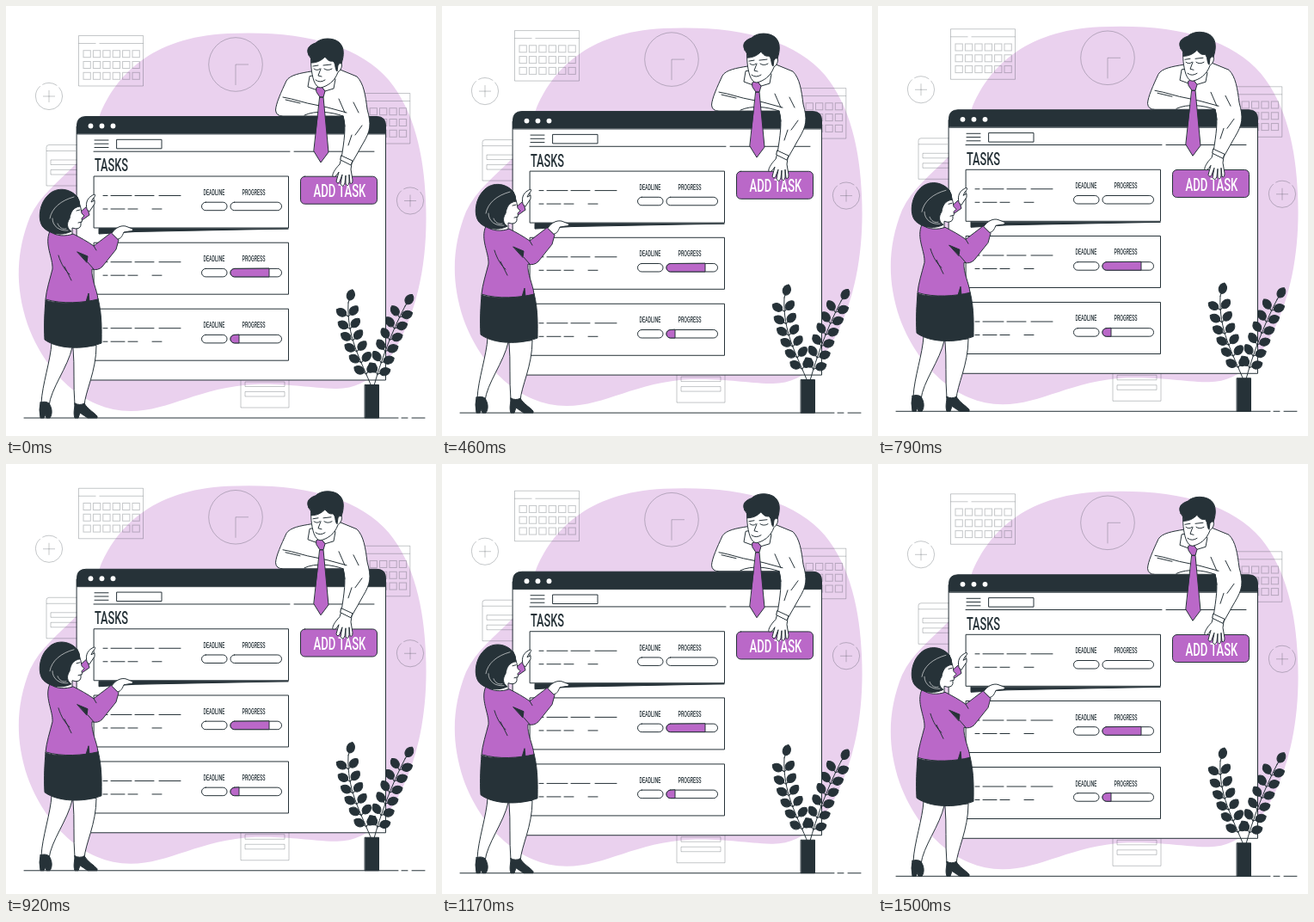
Recreate the animation shown at these times as an HTML page. Size 500 by 500 pixels, loop 1540 ms.

```html
<!DOCTYPE html>
<html lang="en">
<head>
<meta charset="utf-8">
<title>Task board</title>
<style>
html, body { margin: 0; width: 100%; height: 100%; overflow: hidden; background: #fff }
svg { display: block; width: 100%; height: 100% }
.line { fill: none; stroke: #263238; stroke-linecap: round; stroke-linejoin: round }
.white { fill: #fff }
.dark { fill: #263238 }
.purple { fill: #ba68c8 }
.faint { fill: none; stroke: #263238; stroke-opacity: .27 }
/* one narrow cut of the face for every label */
text { font-family: Roboto, sans-serif; font-weight: 500; fill: #263238; stroke: none;
  transform-box: fill-box; transform-origin: 0 0; transform: scaleX(.64) }
.label { font-size: 8.4px }
</style>
</head>
<body>
<svg viewBox="0 0 500 500">
<defs>
  <g id="calendar">
    <path d="M0 0H75V58.500H0ZM0 9H20M24 9H75"/>
    <g id="cells"></g>
  </g>
  <path id="note" d="M3 0H56V47.500H0V3Q0 0 3 0M0 7H34M38 7H56M5 17.500H51V23H5ZM5 29H51V34.500H5Z"/>
  <g id="plus">
    <circle r="15.6" stroke-dasharray="62 3 18 3"/>
    <path d="M-7 0H7M0-7V7"/>
  </g>
  <g id="card">
    <path class="white" d="M102.500 0H328.500V60H102.500Z"/>
    <path d="M113 22.500H118M122 22.500H146M150 22.500H172M178 22.500H203M113 38H118M122 38H138M142 38H153M170 38H181"/>
    <text class="label" x="229.500" y="22">DEADLINE</text>
    <text class="label" x="274.500" y="22">PROGRESS</text>
    <rect class="white" x="227.500" y="30.200" width="29.500" height="9.500" rx="4.700"/>
    <rect class="white" x="261" y="30.200" width="59.500" height="9.500" rx="4.700"/>
  </g>
  <path id="leaf" d="M0 0L0-3C-6-5-6-13 0-16C6-13 6-5 0-3"/>
</defs>

<g id="scene">
  <path fill="#ead1ee" d="M258 32C345 28 410 45 445 86C475 122 486 175 488 225C491 285 482 340 460 385C448 410 425 446 383 445C350 444 330 439 290 440C225 443 190 471 145 471C90 471 45 425 25 370C10 325 12 285 28 245C40 220 60 205 82 183C100 165 102 145 109 127C127 82 168 36 258 32Z"/>

  <g class="faint">
    <use href="#calendar" x="84.500" y="34.500"/>
    <use href="#calendar" x="394.800" y="101.500"/>
    <circle cx="267" cy="68" r="31.300"/>
    <path d="M267 92V68H282"/>
    <use href="#plus" x="50" y="105"/>
    <use href="#plus" x="470" y="226.500"/>
    <use href="#note" x="47" y="161.500"/>
    <use href="#note" x="273" y="419.500"/>
  </g>

  <g class="line">
    <path d="M21 479H456M460 479H467M472 479H487"/>

    <!-- window -->
    <path class="white" d="M82.500 140H441.500V435H82.500Z"/>
    <path class="dark" d="M82.500 148.500V139Q82.500 128.500 93 128.500H431Q441.500 128.500 441.500 139V148.500Z"/>
    <g class="white" stroke="none">
      <circle cx="98.500" cy="139.500" r="2.900"/>
      <circle cx="111.500" cy="139.500" r="2.900"/>
      <circle cx="124.500" cy="139.500" r="2.900"/>
    </g>
    <path d="M103 156H119M103 160.200H119M103 164.500H119M129 155.300H181V165.800H129ZM102 169.200H330M335 169.200H428"/>
    <text x="103" y="192.500" font-size="20">TASKS</text>

    <!-- task cards -->
    <path class="dark" d="M108 259V265L150 262.500L328 259Z"/>
    <use href="#card" y="198"/>
    <use href="#card" y="275.200"/>
    <use href="#card" y="352.200"/>
    <path class="purple" d="M306 305.400V314.900H265.700A4.700 4.700 0 0 1 265.700 305.400Z"/>
    <path class="purple" d="M271 382.400V391.900H265.700A4.700 4.700 0 0 1 265.700 382.400Z"/>

    <rect class="purple" x="342.500" y="198.200" width="89" height="32" rx="5"/>
    <text x="357.500" y="222.300" font-size="20.500" style="fill:#fff">ADD TASK</text>

    <!-- woman -->
    <path class="purple" d="M86 240L94 233L97 243L87 250Z"/>
    <path class="white" d="M94 236C92 228 95 222 103 219Q105 220 101 224L99 228L103 226V230L97 239Z"/>
    <path class="white" d="M76 226H84L87 235L88 241L91 244L88 247L88.500 250L87 252Q88 259 81 259L77 258V268L60 275L54 258Z"/>
    <path d="M82 238L86 237M84 252L88 251"/>
    <path class="white" d="M53 392C52 412 42 440 41 462L50 465C52 445 72 420 77 397ZM78 397C80 420 78 440 80 464L91 465C92 448 105 425 105 395Z"/>
    <path class="dark" d="M40 461Q46 459 50 462C54 468 54 475 51 479H47L46 475L44 479H40Q38 469 40 461ZM80 462Q86 465 91 462C95 469 103 473 106 477V479H95L86 473L84 479H80C78 473 80 468 80 462Z"/>
    <path class="dark" d="M46 342C58 347 90 346 107 340C112 360 111 380 111 392C90 400 60 399 45 388C44 370 45 355 46 342Z"/>
    <path class="purple" d="M51 262C58 268 70 268 78 265C86 269 95 274 102 279L123 263L131 272L128 283L112 303Q107 308 100 306C99 318 106 330 107 341C90 345 65 347 46 341C47 330 51 318 54 306C55 293 44 277 51 262Z"/>
    <path class="dark" d="M83 286L95 291L94 298ZM93 344L96 334L97 344Z"/>
    <path d="M61 290C64 300 69 308 74 312M68 303L76 319M95 298L102 306M102 279L105 284"/>
    <path class="white" d="M123 264C128 257 134 255 139 256L147 259Q149 262 143 262L137 263C135 268 133 271 130 271Z"/>
    <path class="dark" d="M83 222C73 210 56 211 48 221C38 231 36 252 45 259C53 266 67 267 76 262C71 259 70 253 74 247C75 240 78 234 86 233Q86 226 83 222Z"/>
    <path d="M79 222C64 226 53 235 51 247M54 247C54 256 62 262 72 261M60 253C62 258 66 260 70 259" stroke="#fff" stroke-width=".6"/>

    <!-- man -->
    <path class="white" d="M355 76C343 78 330 80 326 87C320 100 314 113 313.500 121Q314 128 322 128H392C396 140 393 158 390 177L402 183L415 160C424 145 425 138 420 120C418 104 416 90 408 82L386 73Z"/>
    <path d="M322 106C335 108 347 113 360 115L374 118L396 124M325 109L342 113M347 127C360 121 378 123 392 128M387 108L394 124M404 112L410 124M392 128L394 140M402 150L398 162M414 139L406 150"/>
    <path class="white" d="M353 82L351 94L362 98L366 93L371 99L381 96L383 85L374 78Z"/>
    <path class="purple" d="M361 95L366 93L371 99L369 106H365L361 100ZM365 106H369L375 170L366 182L358 169Z"/>
    <path class="white" d="M355 57C354 66 355 78 358 87Q361 95 366 95C374 93 382 88 386 77Q392 72 390 66Q387 64 384 69L378 50Z"/>
    <path d="M358 73Q362 76 365 73M370 73Q374 76 379 73M357 70L363 69M369 69L378 68M366 73L363 81L367 82M360 86Q365 90 371 86"/>
    <path class="dark" d="M352 57C348 49 354 45 360 43C367 36 381 37 387 42C394 48 393 58 390 67Q388 65 386 69L385 76C382 73 384 67 380 64C376 65 373 62 371 59C366 64 361 66 355 66Q356 61 352 57Z"/>
    <path class="white" d="M390 177L388 184C382 190 379 196 380 198Q383 200 387 193L384 204Q386 208 388 204L391 196L389 207Q392 212 394 206L395 197V207Q398 211 399 205L399 196L400 206Q403 208 403 202L401 190L402 183Z"/>
    <path class="white" d="M390 174L403 180L401 185L389 179Z"/>

    <!-- plant -->
    <g id="plant" class="dark">
      <path d="M417.500 440.500H433.500V479H417.500Z"/>
    </g>
  </g>
</g>
</svg>

<script>
const $ = id => document.getElementById(id);

let cells = '';
for (let row = 0; row < 3; row++)
  for (let col = 0; col < 6; col++)
    cells += `<rect x="${5.5 + col * 11.4}" y="${17.2 + row * 12.8}" width="8.3" height="8"/>`;
$('cells').innerHTML = cells;

const leaf = (x, y, angle) =>
  `<use href="#leaf" transform="translate(${x} ${y}) rotate(${angle})"/>`;

// stem: cubic control points, leaf angles on each side, angle of the tip
function branch(stem, left, right, tip) {
  const at = (u, k) => (1 - u) ** 3 * stem[0][k] + 3 * (1 - u) ** 2 * u * stem[1][k]
    + 3 * (1 - u) * u * u * stem[2][k] + u ** 3 * stem[3][k];
  let out = `<path fill="none" d="M${stem[0]}C${stem.slice(1)}"/>` + leaf(...stem[3], tip);
  for (let i = 0; i < 6; i++) {
    const u = .17 + i * .138, x = at(u, 0), y = at(u, 1);
    out += leaf(x, y, left) + leaf(x, y, right);
  }
  return out;
}
$('plant').insertAdjacentHTML('beforeend',
  branch([[426, 445], [412, 410], [396, 385], [398, 345]], -60, 42, 18) +
  branch([[427, 445], [436, 412], [448, 380], [464, 349]], -34, 70, 32));

const LOOP = 1540, STEP = LOOP / 37, TOP = 690, LOW = 1480;

// steady float up and back down, in 24 fps steps
function lift(t) {
  if (t <= TOP) return -8.9 * t / TOP;
  if (t <= LOW) return -8.9 + 9.35 * (t - TOP) / (LOW - TOP);
  return .45 * (LOOP - t) / (LOOP - LOW);
}

function draw() {
  const t = Math.floor(performance.now() % LOOP / STEP) * STEP;
  $('scene').setAttribute('transform', `translate(0 ${lift(t).toFixed(2)})`);
  requestAnimationFrame(draw);
}
draw();
</script>
</body>
</html>
```
